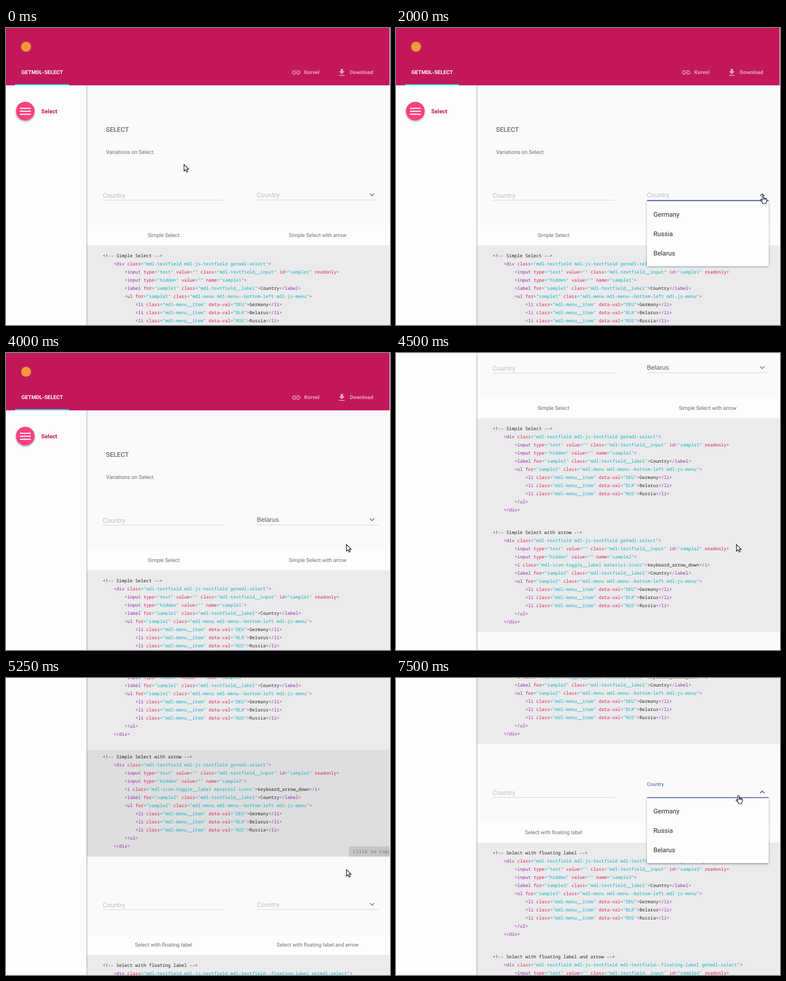
These frames come from a looping animation (851 by 658 pixels, 8000 ms). An HTML page with a canvas:

```html
<!DOCTYPE html>
<html lang="en">
<head>
<meta charset="utf-8">
<title>Select demo</title>
<style>
  html, body { margin: 0; width: 100%; height: 100%; overflow: hidden; background: #fdfdfd; }
  canvas { display: block; }
</style>
</head>
<body>
<canvas id="stage" width="851" height="658"></canvas>
<script>
const W = 851, H = 658, LOOP = 8000, STEP = 250;
const ctx = document.getElementById('stage').getContext('2d');
ctx.textRendering = 'geometricPrecision';

const SECTION = 692;          // distance between the two demo sections
const CHAR = 6.02, LINE = 18;
const INDIGO = '#3f51b5';
const COUNTRIES = ['Germany', 'Russia', 'Belarus'];

const roboto = (size, weight = 400) => `${weight} ${size}px Roboto, sans-serif`;
const mono = size => `${size}px "Noto Sans Mono", monospace`;

const ICONS = {
  link: new Path2D('M3.9 12c0-1.71 1.39-3.1 3.1-3.1h4V7H7c-2.76 0-5 2.24-5 5s2.24 5 5 5h4v-1.9H7c-1.71 0-3.1-1.39-3.1-3.1zM8 13h8v-2H8v2zm9-6h-4v1.9h4c1.71 0 3.1 1.39 3.1 3.1s-1.39 3.1-3.1 3.1h-4V17h4c2.76 0 5-2.24 5-5s-2.24-5-5-5z'),
  download: new Path2D('M19 9h-4V3H9v6H5l7 7 7-7zM5 18v2h14v-2H5z'),
  down: new Path2D('M7.41 7.84L12 12.42l4.59-4.58L18 9.25l-6 6-6-6z'),
  up: new Path2D('M7.41 15.41L12 10.83l4.59 4.58L18 14l-6-6-6 6z')
};
const ARROW = new Path2D('M.5 .5V15L4 11.7L6.5 17.2L9 16L6.6 10.8H11Z');
const HAND = new Path2D('M4.5 12V2Q4.5 .5 6 .5Q7.5 .5 7.5 2V6.5Q8.8 5.6 10 7Q11.4 6.4 12.3 7.8Q14.5 7.5 14.5 10V13Q14.5 15.5 13 17V19.5H6V17.5L1 12Q0 10.3 1.6 9.8Q3 9.6 4.5 12Z');

function text(str, x, y, font, color) {
  ctx.font = font;
  ctx.fillStyle = color;
  ctx.fillText(str, x, y);
}

function rect(x, y, w, h, color) {
  ctx.fillStyle = color;
  ctx.fillRect(x, y, w, h);
}

function icon(name, x, y, color) {
  ctx.save();
  ctx.translate(x, y);
  ctx.scale(.9, .9);
  ctx.fillStyle = color;
  ctx.fill(ICONS[name]);
  ctx.restore();
}

function sampleCode(n, title) {
  const id = 'sample' + n;
  const floating = n > 2 ? 'mdl-textfield--floating-label ' : '';
  const item = (code, name) => `            <li class="mdl-menu__item" data-val="${code}">${name}</li>`;
  return [
    `<!-- ${title} -->`,
    `    <div class="mdl-textfield mdl-js-textfield ${floating}getmdl-select">`,
    `        <input type="text" value="" class="mdl-textfield__input" id="${id}" readonly>`,
    `        <input type="hidden" value="" name="${id}">`,
    ...(n % 2 ? [] : ['        <i class="mdl-icon-toggle__label material-icons">keyboard_arrow_down</i>']),
    `        <label for="${id}" class="mdl-textfield__label">Country</label>`,
    `        <ul for="${id}" class="mdl-menu mdl-menu--bottom-left mdl-js-menu">`,
    item('DEU', 'Germany'), item('BLR', 'Belarus'), item('RUS', 'Russia'),
    '        </ul>',
    '    </div>'
  ];
}

function tokenize(line) {
  let inTag = false;
  return [...line.matchAll(/<!--.*-->|<\/?\w+|>|"[^"]*"|=|[\w-]+/g)].map(m => {
    const s = m[0];
    let color = inTag ? '#d81b60' : '#212121';
    if (s.startsWith('<!')) color = '#212121';
    else if (s[0] === '<') { inTag = true; color = '#8e24aa'; }
    else if (s === '>') { inTag = false; color = '#8e24aa'; }
    else if (s[0] === '"' || s === '=') color = '#0eafc6';
    return { s, col: m.index, color };
  });
}

const TITLES = ['Simple Select', 'Simple Select with arrow',
  'Select with floating label', 'Select with floating label and arrow'];
const BLOCKS = TITLES.map((title, i) => ({
  top: (i % 2 ? 718.7 : 481.5) + (i > 1 ? SECTION : 0),
  baseline: (i % 2 ? 737.6 : 507.6) + (i > 1 ? SECTION : 0),
  lines: sampleCode(i + 1, title).map(tokenize)
}));

function drawBlock(block, hovered) {
  const height = 237;
  rect(179, block.top, W - 179, height, hovered ? '#dedede' : '#ebebeb');
  block.lines.forEach((tokens, row) => tokens.forEach(t =>
    text(t.s, 214.5 + t.col * CHAR, block.baseline + row * LINE, mono(10.03), t.color)));
  if (!hovered) return;
  const y = block.top + height - 23;
  ctx.fillStyle = '#c6c6c6';
  ctx.beginPath();
  ctx.roundRect(760, y, 100, 23, [4, 0, 0, 0]);
  ctx.fill();
  text('click to copy', 769, y + 15.3, mono(10.7), '#757575');
}

function drawFields(y, { open = 0, value = '', floating = false }) {
  text('Country', 214.3, y + 375.5, roboto(14.4), '#bdbdbd');
  rect(214.5, y + 381, 270, 1, '#cfcfcf');

  if (value) text(value, 556, y + 374.2, '14.4px "Liberation Sans", Arial, sans-serif', '#5c5c5c');
  else if (floating && open) {
    const k = Math.min(1, open * 1.3);
    text('Country', 556, y + 374.6 - 18.8 * k, roboto(14.4 - 3.6 * k), INDIGO);
  } else text('Country', 556, y + 374.6, roboto(14.4), '#bdbdbd');

  rect(556, y + 380.5, 270, 1, '#cfcfcf');
  if (open) {
    const w = 270 * Math.min(1, open * 1.3);
    rect(691 - w / 2, y + 381.5, w, 2, INDIGO);
  }
  icon(open ? 'up' : 'down', 800.7, y + 359, open ? INDIGO : '#757575');
}

function drawCaptions(y, left, right) {
  rect(180, y + 437, W - 180, 45, '#fdfdfd');
  ctx.textAlign = 'center';
  text(left, 349.2, y + 463.3, roboto(11.7), '#6e6e6e');
  text(right, 690.8, y + 463.3, roboto(11.7), '#6e6e6e');
  ctx.textAlign = 'left';
}

function drawMenu(y, open, hovered) {
  const top = y + 383.8, height = 144 * open;
  ctx.save();
  ctx.shadowColor = 'rgba(0,0,0,.38)';
  ctx.shadowBlur = 4;
  ctx.shadowOffsetY = 1.5;
  rect(556, top, 270, height, '#fdfdfd');
  ctx.restore();
  ctx.save();
  ctx.beginPath();
  ctx.rect(556, top, 270, height);
  ctx.clip();
  COUNTRIES.forEach((name, i) => {
    const itemTop = top + 7.2 + i * 43.2;
    if (i === hovered) rect(556, itemTop, 270, 43.2, '#eeeeee');
    text(name, 570.5, itemTop + 26.6, roboto(14.4), '#2a2a2a');
  });
  ctx.restore();
}

function drawHeader() {
  rect(0, 0, W, 127, '#c2185b');
  ctx.fillStyle = '#f09a35';
  ctx.beginPath();
  ctx.arc(44.5, 41.5, 11, 0, 7);
  ctx.fill();
  text('GETMDL-SELECT', 34.3, 102.4, roboto(11.7, 700), '#fff');
  rect(20, 124.5, 119.5, 2.5, '#3fdff0');
  const pale = '#e7a3be';
  icon('link', 632.3, 87.7, pale);
  text('Korvel', 661, 102.4, roboto(11.7, 700), pale);
  icon('download', 733.5, 88, pale);
  text('Download', 762, 102.4, roboto(11.7, 700), pale);
}

function drawSidebar(scroll) {
  rect(0, 0, 179, H, '#fdfdfd');
  const edge = ctx.createLinearGradient(178, 0, 182, 0);
  edge.addColorStop(0, 'rgba(0,0,0,.22)');
  edge.addColorStop(1, 'rgba(0,0,0,0)');
  rect(178, 0, 4, H, edge);
  ctx.save();
  ctx.translate(0, -scroll);
  ctx.save();
  ctx.shadowColor = 'rgba(0,0,0,.4)';
  ctx.shadowBlur = 4;
  ctx.shadowOffsetY = 2;
  ctx.fillStyle = '#ff4081';
  ctx.beginPath();
  ctx.arc(42.7, 184, 20.6, 0, 7);
  ctx.fill();
  ctx.restore();
  for (let i = -1; i < 2; i++) rect(31, 183.3 + i * 6.6, 24, 2.4, '#fff');
  text('Select', 78, 189, roboto(12.6, 700), '#c2185b');
  ctx.restore();
}

function drawCursor(x, y, hand) {
  ctx.save();
  ctx.translate(hand ? x - 5 : x, y);
  ctx.fillStyle = '#fff';
  ctx.strokeStyle = '#000';
  ctx.lineWidth = 1.2;
  const shape = hand ? HAND : ARROW;
  ctx.fill(shape);
  ctx.stroke(shape);
  if (hand) {
    ctx.beginPath();
    for (const fx of [7.5, 10, 12.3]) { ctx.moveTo(fx, 7); ctx.lineTo(fx, 10.5); }
    ctx.stroke();
  }
  ctx.restore();
}

// Each key is [time, ...values]; values ease between neighbouring keys.
const POINTER = [[0, 394, 302], [1500, 812, 370], [2000, 812, 370], [2750, 757, 492],
  [3250, 757, 492], [3750, 754, 424], [5750, 754, 424], [6250, 754, 267], [6500, 758, 259.5]];
const SCROLL = [[4000, 0], [4250, 155], [4500, 337], [4750, 402], [5000, 402],
  [5250, 560], [5500, 770], [5750, 809]];

function sample(keys, t) {
  const i = keys.findIndex(k => k[0] > t);
  if (i < 0) return keys[keys.length - 1].slice(1);
  if (i === 0) return keys[0].slice(1);
  const a = keys[i - 1], b = keys[i];
  const p = (t - a[0]) / (b[0] - a[0]), e = p * p * (3 - 2 * p);
  return a.slice(1).map((v, j) => v + (b[j + 1] - v) * e);
}

function hoveredBlock(t) {
  if (t >= 3250 && t < 3500) return 0;
  if (t >= 5000 && t < 5750) return 1;
  return t >= 5750 && t < 6000 ? 2 : -1;
}

function draw(t) {
  const [scroll] = sample(SCROLL, t);
  const [px, py] = sample(POINTER, t);
  const firstOpen = t < 1750 || t >= 3250 ? 0 : t < 2000 ? .6 : 1;
  const secondOpen = t < 7250 ? 0 : t < 7500 ? .6 : 1;
  const hover = hoveredBlock(t);

  rect(0, 0, W, H, '#fafafa');
  ctx.save();
  ctx.translate(0, -scroll);
  text('SELECT', 221.5, 229.6, roboto(14.4, 500), '#6a6a6a');
  text('Variations on Select.', 221.7, 278.5, roboto(11.9), '#6e6e6e');
  drawFields(0, { open: firstOpen, value: t >= 3250 ? 'Belarus' : '' });
  drawFields(SECTION, { open: secondOpen, floating: true });
  drawCaptions(0, TITLES[0], TITLES[1]);
  drawCaptions(SECTION, TITLES[2], TITLES[3]);
  BLOCKS.forEach((block, i) => drawBlock(block, i === hover));
  ctx.restore();

  drawSidebar(scroll);

  ctx.save();
  ctx.translate(0, -scroll);
  drawHeader();
  if (firstOpen) drawMenu(0, firstOpen, py > 391 ? Math.floor((py - 391) / 43.2) : -1);
  if (secondOpen) drawMenu(SECTION - .8, secondOpen, -1);
  ctx.restore();

  rect(850, 0, 1, H, '#fdfdfd');
  drawCursor(px, py, (t >= 1000 && t < 3250) || t >= 6250);
}

function tick(now) {
  draw(Math.floor(now % LOOP / STEP) * STEP);
  requestAnimationFrame(tick);
}
requestAnimationFrame(tick);
</script>
</body>
</html>
```
